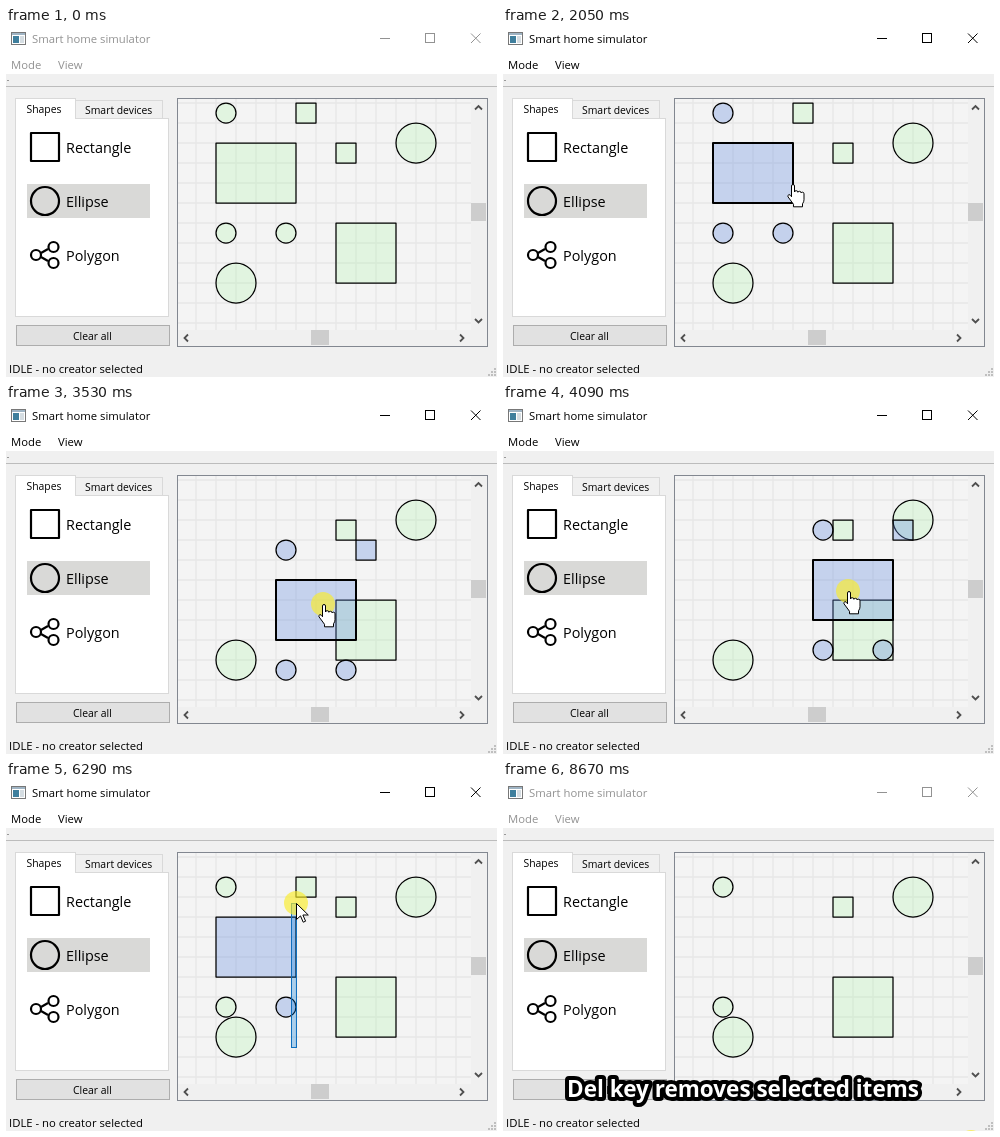
An HTML page that plays this animation: 491 px wide and 349 px high, repeating every 8.71 s.

```html
<!DOCTYPE html>
<html lang="en">
<head>
<meta charset="utf-8">
<title>Smart home simulator</title>
<style>
  html, body { margin: 0; width: 100%; height: 100%; overflow: hidden; background: #f0f0f0; }
  svg { display: block; width: 491px; height: 349px; font-family: "Open Sans", "Noto Sans", sans-serif; }
  .crisp { shape-rendering: crispEdges; }
  .ui { font-size: 11.3px; }
  .small { font-size: 10.4px; }
  .list { font-size: 14.4px; }
  .icon, .chevron { fill: none; stroke: #000; stroke-width: 2.2; stroke-linejoin: round; }
  .chevron { stroke: #505050; stroke-width: 1.8; stroke-linejoin: miter; }
  #window { --ink: #000; }
  #window.inactive { --ink: #929292; }
  .ink { fill: var(--ink); }
  .controls { fill: none; stroke: var(--ink); }
  #shapes * { stroke: #000; stroke-linejoin: round; fill: rgba(150, 245, 145, .2); }
  #shapes .selected { fill: rgba(100, 140, 222, .33); }
  #caption { font-size: 22.5px; font-weight: 700; fill: #fff; stroke: #000; stroke-width: 8;
    stroke-linejoin: round; paint-order: stroke; }
</style>
</head>
<body>
<svg id="window" viewBox="0 0 491 349">
  <defs>
    <pattern id="grid" x="10" y="15" width="20" height="20" patternUnits="userSpaceOnUse">
      <path d="M0 0V20M20 0V20M0 0H20M0 20H20" stroke="#e7e7e7" stroke-width="1.3"/>
    </pattern>
    <pattern id="dots" x="482" y="340" width="3" height="3" patternUnits="userSpaceOnUse">
      <rect width="2" height="2" fill="#bfbfbf"/>
    </pattern>
    <clipPath id="view"><rect x="172" y="71" width="293" height="231"/></clipPath>
  </defs>

  <!-- title bar, menu and tool bar -->
  <rect width="491" height="349" fill="#f0f0f0"/>
  <rect width="491" height="46" fill="#fff"/>
  <path class="crisp" d="M0 58.5H491" stroke="#bcbcbc"/>
  <path class="crisp" d="M1 52.5h2" stroke="#999"/>
  <g class="crisp">
    <rect x="5.5" y="4.5" width="14" height="12" fill="#fff" stroke="#777"/>
    <rect x="6" y="5" width="13" height="2" fill="#9fb4c4"/>
    <rect x="7" y="8" width="6" height="7" fill="#3f7f9d"/>
    <rect x="14" y="8" width="4" height="7" fill="#d5dde2"/>
  </g>
  <g class="ui ink">
    <text x="26" y="15">Smart home simulator</text>
    <text x="5" y="41">Mode</text>
    <text x="52" y="41">View</text>
  </g>
  <path class="controls crisp" d="M374 10.5h10M419.5 5.5h9v9h-9z"/>
  <path class="controls" d="M465 5.5l9.5 9.5M474.5 5.5l-9.5 9.5"/>

  <!-- shape palette -->
  <g class="crisp" stroke="#d9d9d9">
    <rect x="69.5" y="72.5" width="87" height="18" fill="#f0f0f0"/>
    <rect x="9.5" y="90.5" width="153" height="198" fill="#fff"/>
    <path d="M9.5 91V70.5H69.5V91" fill="#fff"/>
    <rect x="10.5" y="297.5" width="153" height="20" fill="#e1e1e1" stroke="#adadad"/>
  </g>
  <rect x="21" y="156" width="123" height="34" fill="#d9d9d7"/>
  <g class="icon">
    <rect x="25" y="105" width="28" height="28"/>
    <circle cx="39" cy="173" r="14"/>
    <path d="M35 225l7-4M35 229l7 4"/>
    <circle cx="30" cy="227" r="5"/>
    <circle cx="47.5" cy="219" r="5"/>
    <circle cx="47.5" cy="235" r="5"/>
  </g>
  <g class="list">
    <text x="60" y="125">Rectangle</text>
    <text x="60" y="179">Ellipse</text>
    <text x="60" y="233">Polygon</text>
  </g>
  <g class="small">
    <text x="20.5" y="85">Shapes</text>
    <text x="79" y="86">Smart devices</text>
    <text x="67" y="312">Clear all</text>
  </g>
  <text class="ui" x="3" y="345">IDLE - no creator selected</text>
  <path d="M488 340h2v8h-8v-2h3v-3h3z" fill="url(#dots)"/>

  <!-- scene view -->
  <rect class="crisp" x="171.5" y="70.5" width="310" height="248" fill="#f0f0f0" stroke="#828790"/>
  <rect x="172" y="71" width="293" height="231" fill="#f4f4f4"/>
  <rect x="172" y="71" width="293" height="231" fill="url(#grid)"/>
  <path d="M465 175h15v18h-15zM305 302h18v15h-18z" fill="#cdcdcd"/>
  <path class="chevron" d="M469 81.5l3.5-3.5 3.5 3.5M469 291l3.5 3.5 3.5-3.5M182 306.5l-3.5 3.5 3.5 3.5M454 306.5l3.5 3.5-3.5 3.5"/>
  <g id="shapes" clip-path="url(#view)"></g>
  <rect id="band" class="crisp" fill="rgba(0,120,215,.3)" stroke="#0f6fbe"/>

  <text id="caption" x="64" y="314.5">Del key removes selected items</text>

  <g id="pointer">
    <circle id="press" r="12" fill="rgba(250,236,40,.65)"/>
    <path id="arrow" d="M.5 .5v16l4-3.6 2.7 6.3 2.4-1-2.7-6.2h5.4z" fill="#fff" stroke="#000"/>
    <path id="hand" d="M1 .5q1.5 0 1.5 1.5v6q0-1.3 1.7-1.3t1.7 1.6q0-1 1.6-1t1.7 1.7q.1-.8 1.4-.8t1.4 1.6v6q0 2-1.5 4v3h-9v-2.5l-5.5-7.5q-.6-1.6.8-2t2.2 1l.5 1v-10.8q0-1.5 1.5-1.5z" fill="#fff" stroke="#000"/>
  </g>
</svg>
<script>
const LOOP = 8710;
const GRID = 20;
const $ = id => document.getElementById(id);

// Pointer path: time in ms, x, y
const path = [
  [0, 456, 375], [129, 456, 375], [130, 440, 320], [820, 195, 79], [880, 195, 79],
  [1010, 208, 98], [1390, 237, 142], [1860, 278, 204], [1910, 278, 204],
  [2250, 305, 88], [2460, 305, 88], [2650, 299, 214], [2920, 252, 139], [3000, 252, 139],
  [3310, 292, 179], [3530, 317, 199], [3820, 372, 199], [4000, 372, 199],
  [4420, 248, 141], [4610, 248, 141], [4660, 248, 158], [5020, 248, 158],
  [5440, 335, 232], [5680, 335, 232], [5850, 285, 265], [5900, 285, 265],
  [6290, 290, 121], [6470, 295, 97], [7460, 295, 97], [7690, 253, 159],
  [8240, 253, 159], [8640, 468, 360], [LOOP, 468, 360],
];
const firstBand = { start: 850, end: 1910 };
const addClick = { start: 2250, end: 2460 };
const drag = { start: 2960, end: 5020 };
const secondBand = { start: 5850, end: 6520 };
const lastClick = { start: 8640, end: LOOP };
const presses = [firstBand, addClick, drag, secondBand, lastClick];
const deleteTime = 6980;
const captionTime = 6470;

const during = (t, span) => t >= span.start && t < span.end;

function pointerAt(t) {
  const i = Math.max(1, path.findIndex(p => p[0] >= t));
  const [t0, x0, y0] = path[i - 1], [t1, x1, y1] = path[i];
  const k = (t - t0) / (t1 - t0);
  return { x: x0 + (x1 - x0) * k, y: y0 + (y1 - y0) * k };
}

function makeShape(type, x, y, w, h = w) {
  const node = document.createElementNS("http://www.w3.org/2000/svg", type);
  return { type, x, y, w, h, node };
}
const circle = (cx, cy, r) => makeShape("circle", cx - r, cy - r, 2 * r);
const rect = (...box) => makeShape("rect", ...box);

const addedSquare = rect(290, 75, 20);
const shapes = [
  circle(410, 115, 20), rect(330, 115, 20), rect(330, 195, 60), circle(230, 255, 20),
  circle(220, 85, 10), addedSquare, circle(220, 205, 10), circle(280, 205, 10),
  rect(210, 115, 80, 60),
];
$("shapes").append(...shapes.map(s => s.node));

function bandBox(span, t) {
  const a = pointerAt(span.start), b = pointerAt(Math.min(t, span.end));
  return { x: Math.min(a.x, b.x), y: Math.min(a.y, b.y), w: Math.abs(b.x - a.x), h: Math.abs(b.y - a.y) };
}
const touches = (a, b) =>
  a.x <= b.x + b.w && b.x <= a.x + a.w && a.y <= b.y + b.h && b.y <= a.y + a.h;

const finalBand = bandBox(firstBand, firstBand.end);
const group = new Set(shapes.filter(s => s === addedSquare || touches(s, finalBand)));

function dragOffset(t) {
  if (t < drag.start) return { x: 0, y: 0 };
  const from = pointerAt(drag.start), to = pointerAt(Math.min(t, drag.end));
  const snap = d => Math.round(d / GRID) * GRID;
  return { x: snap(to.x - from.x), y: snap(to.y - from.y) };
}

function boxAt(s, t) {
  const d = group.has(s) ? dragOffset(t) : { x: 0, y: 0 };
  return { x: s.x + d.x, y: s.y + d.y, w: s.w, h: s.h };
}

function isSelected(s, box, t) {
  if (t < firstBand.start) return false;
  if (t >= secondBand.start) return touches(box, bandBox(secondBand, t));
  if (s === addedSquare) return t >= addClick.start;
  return touches(s, bandBox(firstBand, t));
}

function contains(s, box, p) {
  const dx = p.x - box.x - box.w / 2, dy = p.y - box.y - box.h / 2;
  return s.type === "circle" ? Math.hypot(dx, dy) <= box.w / 2
    : Math.abs(dx) <= box.w / 2 && Math.abs(dy) <= box.h / 2;
}

function setAttributes(node, values) {
  for (const name in values) node.setAttribute(name, values[name]);
}
const show = (id, visible) => $(id).style.display = visible ? "" : "none";

function draw(t) {
  const tip = pointerAt(t);
  const band = [firstBand, secondBand].find(span => during(t, span));
  const items = shapes.map(s => {
    const box = boxAt(s, t), selected = isSelected(s, box, t);
    return { s, box, selected, visible: !(selected && t >= deleteTime) };
  });
  const hovered = band ? undefined
    : items.filter(i => i.visible && contains(i.s, i.box, tip)).pop();

  for (const item of items) {
    const { s, box, selected, visible } = item;
    s.node.style.display = visible ? "" : "none";
    setAttributes(s.node, {
      class: selected ? "selected" : "",
      "stroke-width": item === hovered ? 2 : 1.25,
    });
    setAttributes(s.node, s.type === "circle"
      ? { cx: box.x + box.w / 2, cy: box.y + box.h / 2, r: box.w / 2 }
      : { x: box.x, y: box.y, width: box.w, height: box.h });
  }

  show("band", band);
  if (band) {
    const { x, y, w, h } = bandBox(band, t);
    setAttributes($("band"), {
      x: Math.round(x) + .5, y: Math.round(y) + .5, width: Math.round(w), height: Math.round(h),
    });
  }

  $("pointer").setAttribute("transform", `translate(${Math.round(tip.x)} ${Math.round(tip.y)})`);
  show("press", presses.some(span => during(t, span)));
  show("hand", hovered);
  show("arrow", !hovered);
  show("caption", t >= captionTime);
  $("window").classList.toggle("inactive", t < firstBand.start || t >= lastClick.start);
}

const begin = performance.now();
function tick() {
  draw((performance.now() - begin) % LOOP);
  requestAnimationFrame(tick);
}
tick();
</script>
</body>
</html>
```
